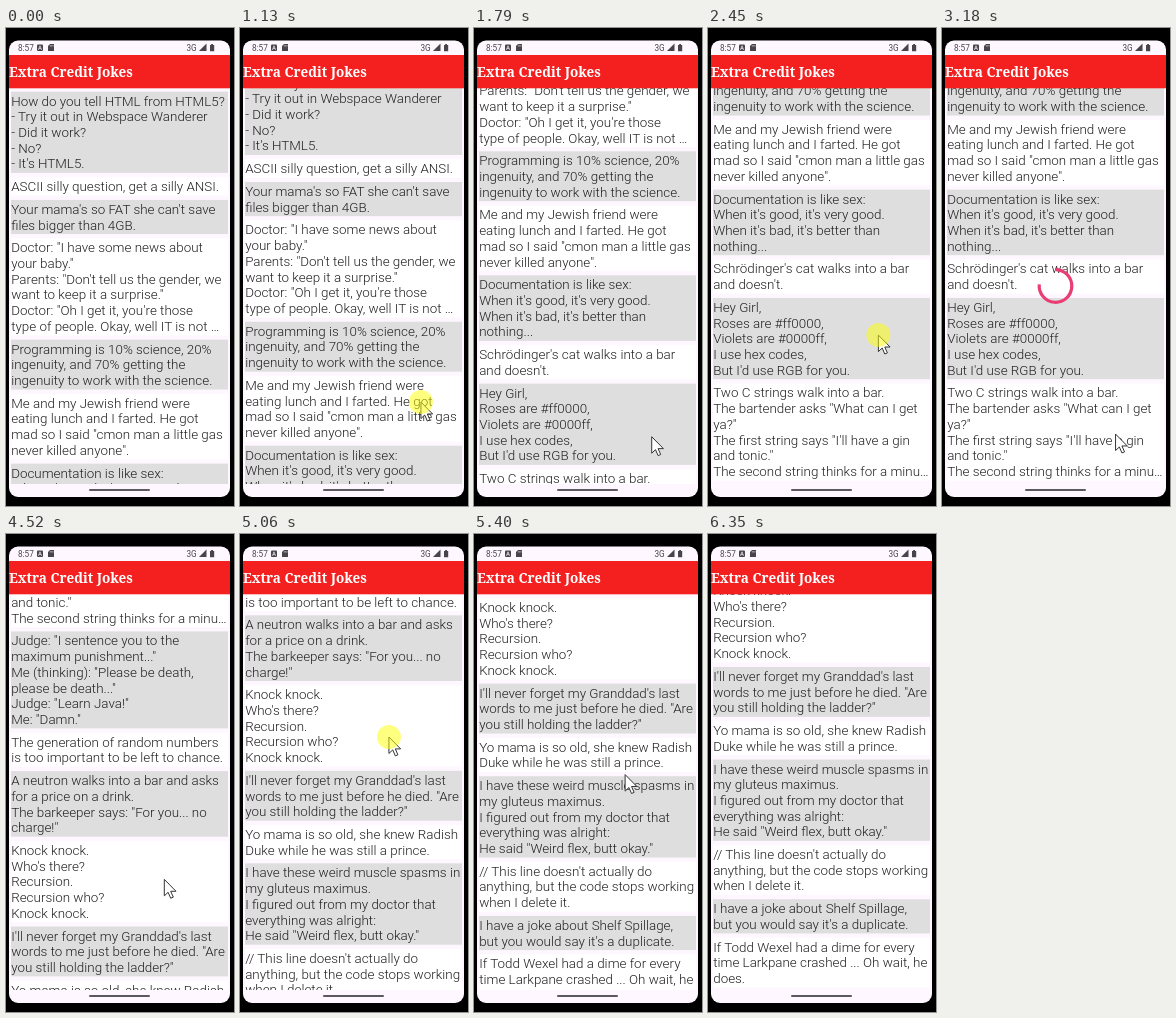
An HTML page that plays this animation: 228x478 px, repeating every 6480 ms.

```html
<!DOCTYPE html>
<html lang="en">
<head>
<meta charset="utf-8">
<title>Jokes list</title>
<style>
  html, body { margin: 0; width: 100%; height: 100%; overflow: hidden; background: #000; }
  svg { display: block; width: 228px; height: 478px; }
  .body { font: 300 13.4px Roboto, sans-serif; fill: #1f1f1f; white-space: pre; }
  .title { font: 700 13.5px "Noto Serif", serif; fill: #fff; }
  .status { font: 400 8.2px Roboto, sans-serif; fill: #47454a; }
</style>
</head>
<body>
<svg viewBox="0 0 228 478" xmlns="http://www.w3.org/2000/svg">
  <defs>
    <clipPath id="view"><rect x="3" y="60" width="221" height="396"/></clipPath>
  </defs>
  <rect width="228" height="478" fill="#000"/>
  <rect x="3" y="12.5" width="221" height="456.5" rx="9" fill="#fef7ff"/>

  <g class="status">
    <text x="12" y="23">8:57</text>
    <text x="180.5" y="23">3G</text>
    <rect x="31" y="16.5" width="6" height="6.5" rx="1"/>
    <path d="M34 17.8l-1.6 4M34 17.8l1.6 4M33 20.6h2" stroke="#fef7ff" stroke-width=".7"/>
    <path d="M44 16h4v7h-6v-5z"/>
    <path d="M44.3 17v1.6M45.7 17v1.6M47 17v1.6" stroke="#fef7ff" stroke-width=".5"/>
    <path d="M193 23h7.5v-7.5z"/>
    <path d="M204 17h1.2v-1h1.8v1h1.2v6.2h-4.2z"/>
  </g>

  <g clip-path="url(#view)"><g id="list"></g></g>
  <rect x="3" y="27" width="221" height="33.3" fill="#f3201f"/>
  <text class="title" x="3" y="48.6">Extra Credit Jokes</text>
  <rect x="83" y="461" width="61" height="2" rx="1" fill="#5b595d"/>

  <path id="spinner" fill="none" stroke="#e83e74" stroke-width="3.2"/>
  <g id="cursor">
    <path d="M0 0V16.5L3.8 12.9 6.4 18.9 9 17.8 6.4 11.9H11.7Z"
      fill="#fff" stroke="#333" stroke-width="1" stroke-linejoin="round"/>
    <circle id="touch" r="12" fill="#ff0" fill-opacity=".5"/>
  </g>
</svg>
<script>
const jokes = `How do you tell HTML from HTML5?
- Try it out in Webspace Wanderer
- Did it work?
- No?
- It's HTML5.

ASCII silly question, get a silly ANSI.

Your mama's so FAT she can't save
files bigger than 4GB.

Doctor: "I have some news about
your baby."
Parents: "Don't tell us the gender, we
want to keep it a surprise."
Doctor: "Oh I get it, you're those
type of people. Okay, well IT is not …

Programming is 10% science, 20%
ingenuity, and 70% getting the
ingenuity to work with the science.

Me and my Jewish friend were
eating lunch and I farted. He got
mad so I said "cmon man a little gas
never killed anyone".

Documentation is like sex:
When it's good, it's very good.
When it's bad, it's better than
nothing...

Schrödinger's cat walks into a bar
and doesn't.

Hey Girl,
Roses are #ff0000,
Violets are #0000ff,
I use hex codes,
But I'd use RGB for you.

Two C strings walk into a bar.
The bartender asks "What can I get
ya?"
The first string says "I'll have a gin
and tonic."
The second string thinks for a minu…

Judge: "I sentence you to the
maximum punishment..."
Me (thinking): "Please be death,
please be death..."
Judge: "Learn Java!"
Me: "Damn."

The generation of random numbers
is too important to be left to chance.

A neutron walks into a bar and asks
for a price on a drink.
The barkeeper says: "For you... no
charge!"

Knock knock.
Who's there?
Recursion.
Recursion who?
Knock knock.

I'll never forget my Granddad's last
words to me just before he died. "Are
you still holding the ladder?"

Yo mama is so old, she knew Radish
Duke while he was still a prince.

I have these weird muscle spasms in
my gluteus maximus.
I figured out from my doctor that
everything was alright:
He said "Weird flex, butt okay."

// This line doesn't actually do
anything, but the code stops working
when I delete it.

I have a joke about Shelf Spillage,
but you would say it's a duplicate.

If Todd Wexel had a dime for every
time Larkpane crashed ... Oh wait, he
does.`.split("\n\n");

const LOOP = 6480, LINE = 15.7, GAP = 4.25;
const HOLD = 130;    // ms between touch and movement
const SPEED = 0.9;   // px per ms while swiping
const SLOP = 37;     // px of swipe before the list follows
const DRIFT = 0.056; // sideways px per px swiped
const DECAY = 200;   // ms, time constant of a fling
const LOAD = 700;    // ms that the spinner stays

// Each swipe runs from (x, y) up to `end`; the list settles at `rest`,
// and the cursor goes on to `home`, given as [time, x, y].
const swipes = [
  { press: 940, x: 184, y: 429, end: 300, rest: 194, home: [2070, 178, 443] },
  { press: 2170, x: 178, y: 443, end: 300, rest: 274, home: [3100, 174, 408] },
  { press: 3641, x: 171, y: 395, end: 80, rest: 646, home: [4640, 159, 383] },
  { press: 4731, x: 159, y: 383, end: 180, rest: 893, home: [6150, 165, 482] }
];
const loadStarts = [2950, 5650];

swipes.forEach((s, i) => {
  s.move = s.press + HOLD;
  s.release = s.move + (s.y - s.end) / SPEED;
  s.from = i ? swipes[i - 1].rest : 0;
});

const $ = id => document.getElementById(id);
const list = $("list"), spinner = $("spinner"), cursor = $("cursor"), touch = $("touch");
const show = (el, on) => el.setAttribute("visibility", on ? "inherit" : "hidden");
const mix = (a, b, p) => a + (b - a) * p;
const part = (t, a, b) => Math.min(1, Math.max(0, (t - a) / (b - a)));
const smooth = p => (1 - Math.cos(Math.PI * p)) / 2;
const glide = (a, b, p) => [mix(a[0], b[0], p), mix(a[1], b[1], p)];

function add(tag, attrs, text = "") {
  const el = document.createElementNS("http://www.w3.org/2000/svg", tag);
  for (const k in attrs) el.setAttribute(k, attrs[k]);
  el.textContent = text;
  list.append(el);
}

function buildList() {
  let y = 63.6;
  jokes.forEach((joke, i) => {
    const lines = joke.split("\n");
    const height = lines.length * LINE + 2.8;
    add("rect", { x: 5, y, width: 217, height, fill: i % 2 ? "#fff" : "#dedede" });
    lines.forEach((line, n) => add("text", { class: "body", x: 5.2, y: y + 14 + n * LINE }, line));
    y += height + GAP;
  });
}

// Latest swipe whose given phase has begun.
const latest = (phase, t) => swipes.filter(s => t >= s[phase]).pop();

function swipePoint(s, t) {
  const dy = Math.min(s.y - s.end, Math.max(0, (t - s.move) * SPEED));
  return [s.x - dy * DRIFT, s.y - dy];
}

function dragged(s, t) {
  const dy = s.y - swipePoint(s, t)[1];
  return Math.min(s.rest, s.from + Math.max(0, dy - SLOP));
}

function scrollAt(t) {
  const s = latest("move", t);
  if (!s) return 0;
  if (t < s.release) return dragged(s, t);
  return mix(s.rest, dragged(s, s.release), Math.exp((s.release - t) / DECAY));
}

function cursorAt(t) {
  const s = latest("press", t);
  if (!s) return glide([217, 398], [184, 429], smooth(part(t, 270, 740)));
  if (t < s.release) return swipePoint(s, t);
  const [time, ...home] = s.home;
  if (t < time) return glide(swipePoint(s, s.release), home, smooth(part(t, s.release, time)));
  const next = swipes[swipes.indexOf(s) + 1];
  return next ? glide(home, [next.x, next.y], part(t, time, next.press)) : home;
}

function arc(from, sweep) {
  const r = 16.3, rad = Math.PI / 180;
  const pt = a => `${113.5 + r * Math.cos(a * rad)} ${258 + r * Math.sin(a * rad)}`;
  return `M${pt(from)}A${r} ${r} 0 ${sweep > 180 ? 1 : 0} 1 ${pt(from + sweep)}`;
}

function draw(t) {
  list.setAttribute("transform", `translate(0 ${-scrollAt(t)})`);

  const start = loadStarts.find(a => t >= a && t < a + LOAD);
  show(spinner, start);
  if (start) {
    const age = t - start - 230;
    const sweep = 150 + 125 * Math.cos(age / 1333 * 2 * Math.PI);
    spinner.setAttribute("d", arc(-90 + age * 0.4, sweep));
  }

  const [x, y] = cursorAt(t);
  cursor.setAttribute("transform", `translate(${x} ${y})`);
  show(cursor, t >= 270 && t < 6150);
  show(touch, swipes.some(s => t >= s.press && t < s.release));
}

function tick() {
  draw(performance.now() % LOOP);
  requestAnimationFrame(tick);
}
buildList();
tick();
</script>
</body>
</html>
```
